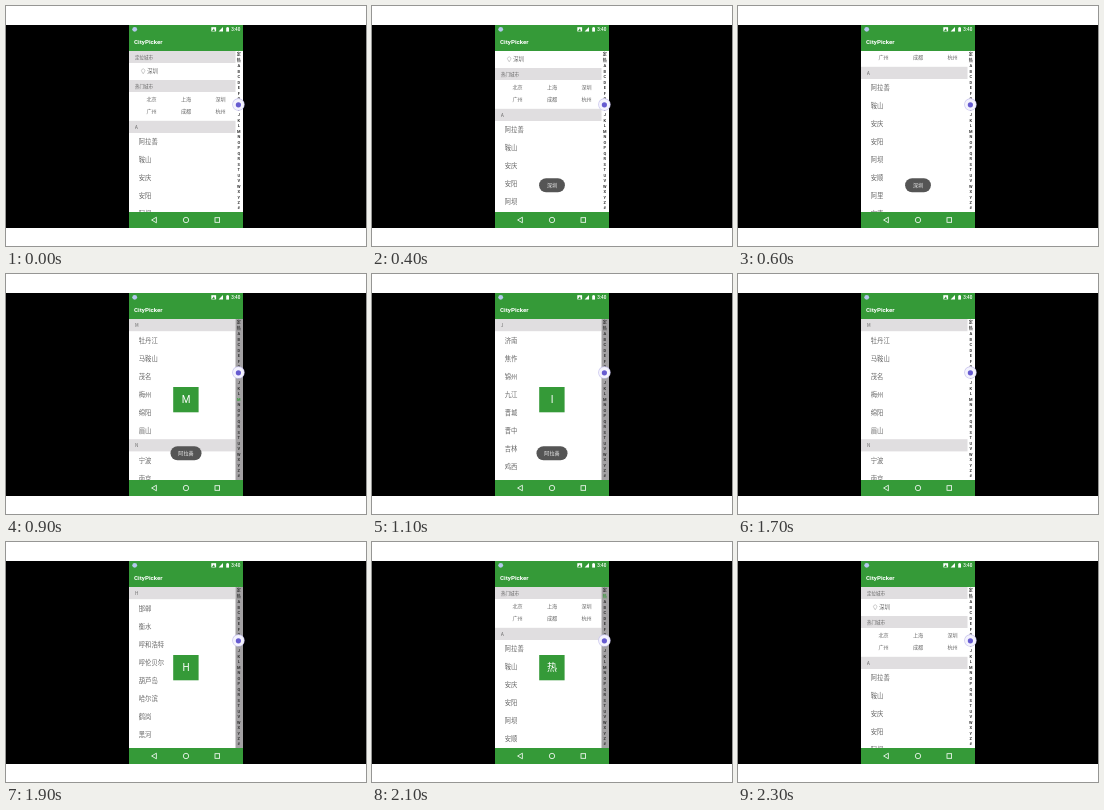
Recreate the animation shown at these times as an HTML page with a canvas. Size 360x240 px, loop 2400 ms.

```html
<!DOCTYPE html>
<html lang="zh-CN">
<head>
<meta charset="utf-8">
<title>CityPicker</title>
<style>
  html, body { margin: 0; width: 100%; height: 100%; overflow: hidden; background: #fff; }
  canvas { display: block; width: 360px; height: 240px; }
</style>
</head>
<body>
<canvas id="stage"></canvas>
<script>
const W = 360, H = 240, STEP = 100, LOOP = 2400;
const LEFT = 123, RIGHT = 237, TOP = 45, BOTTOM = 206, BAR = 229.5;
const HEAD = 12.2, ROW = 18;
const GREEN = '#359a38';
const CJK = '"Noto Sans CJK SC", "Noto Sans CJK", sans-serif';
const LATIN = 'Roboto, "Noto Sans CJK SC", "Noto Sans CJK", sans-serif';

const canvas = document.getElementById('stage');
const ratio = window.devicePixelRatio || 1;
canvas.width = W * ratio;
canvas.height = H * ratio;
const c = canvas.getContext('2d');
c.scale(ratio, ratio);

const hot = ['北京', '上海', '深圳', '广州', '成都', '杭州'];
const cities = {
  A: '阿拉善 鞍山 安庆 安阳 阿坝 安顺 阿里 安康 阿克苏',
  B: '北京 保定 包头 巴彦淖尔 本溪 白山 白城 蚌埠 亳州',
  C: '重庆 承德 沧州 长治 赤峰 朝阳 长春 常州 滁州',
  D: '大同 大连 丹东 大庆 东营 德州 东莞 德阳 达州',
  E: '鄂尔多斯 鄂州 恩施',
  F: '抚顺 阜新 阜阳 福州 抚州 佛山 防城港',
  G: '赣州 广州 桂林 贵港 广元 广安 贵阳 固原',
  H: '邯郸 衡水 呼和浩特 呼伦贝尔 葫芦岛 哈尔滨 鹤岗 黑河 淮安',
  J: '济南 焦作 锦州 九江 晋城 晋中 吉林 鸡西 佳木斯 嘉兴 金华',
  K: '开封 昆明 克拉玛依 喀什',
  L: '廊坊 临汾 吕梁 辽阳 辽源 连云港 丽水 六安 龙岩',
  M: '牡丹江 马鞍山 茂名 梅州 绵阳 眉山',
  N: '宁波 南京 南通 南平 宁德 南昌 南阳 南宁 内江'
};

// List blocks in content coordinates, and where each section starts
const blocks = [];
const start = { 定: 0, 热: 29 };
let end = 69.8;
for (const [letter, names] of Object.entries(cities)) {
  start[letter] = end;
  blocks.push({ y: end, h: HEAD, head: letter });
  end += HEAD;
  for (const name of names.split(' ')) {
    blocks.push({ y: end, h: ROW, name });
    end += ROW;
  }
}
const index = ['定', '热', ...'ABCDEFGHIJKLMNOPQRSTUVWXYZ', '#'];

// Per step: [scroll position or section, touched letter, toast, toast opacity]
const steps = [
  [0], [0, '', '深圳', .4], [0, '', '深圳', 1], [0, '', '深圳', 1],
  [12, '', '深圳', 1], [36, '', '深圳', 1], [54, '', '深圳', 1],
  [54, '', '阿拉善', 1], ['K', 'K', '阿拉善', 1], ['M', 'M', '阿拉善', 1],
  ['K', 'K', '阿拉善', 1], ['J', 'I', '阿拉善', 1], ['H', 'H', '阿拉善', .5],
  ['J', 'J'], ['K', 'K'], ['L', 'L'], ['M', 'M'], ['M'],
  ['L', 'L'], ['H', 'H'], ['C', 'C'], ['热', '热'], ['定', '定'], ['定']
];

function box(x, y, w, h, color) {
  c.fillStyle = color;
  c.fillRect(x, y, w, h);
}

function disc(x, y, r, color) {
  c.fillStyle = color;
  c.beginPath();
  c.arc(x, y, r, 0, Math.PI * 2);
  c.fill();
}

function shape(points, color) {
  c.fillStyle = color;
  c.beginPath();
  points.forEach(([x, y]) => c.lineTo(x, y));
  c.closePath();
  c.fill();
}

function text(str, x, y, size, color, align = 'left', family = CJK, weight = 400) {
  c.font = `${weight} ${size}px ${family}`;
  c.fillStyle = color;
  c.textAlign = align;
  c.textBaseline = 'alphabetic';
  c.fillText(str, x, y + size * .37);
}

function heading(label, y, h = HEAD) {
  box(LEFT, y, BAR - LEFT, h, '#e0dee0');
  text(label, 129, y + h / 2, 4.5, '#666');
}

function drawList(scroll) {
  c.save();
  c.beginPath();
  c.rect(LEFT, TOP, RIGHT - LEFT, BOTTOM - TOP);
  c.clip();
  const base = TOP - scroll;
  if (scroll < 70) {
    heading('定位城市', base, 12);
    c.strokeStyle = '#aaa';
    c.lineWidth = .6;
    c.beginPath();
    c.arc(137.2, base + 19.6, 1.7, Math.PI * .8, Math.PI * 2.2);
    c.lineTo(137.2, base + 22.8);
    c.closePath();
    c.stroke();
    text('深圳', 141.3, base + 20.4, 5.3, '#666');
    heading('热门城市', base + 29, 12);
    hot.forEach((name, i) =>
      text(name, 145.5 + i % 3 * 34.5, base + 48 + Math.floor(i / 3) * 12.5, 5.1, '#666', 'center'));
  }
  for (const b of blocks) {
    const y = base + b.y;
    if (y > BOTTOM || y + b.h < TOP) continue;
    if (b.head) heading(b.head, y);
    else text(b.name, 132.7, y + b.h / 2, 6.35, '#666');
  }
  c.restore();
}

function drawIndex(touched) {
  if (touched) box(BAR, TOP, RIGHT - BAR, BOTTOM - TOP, '#a3a1a3');
  index.forEach((ch, i) =>
    text(ch, 232.8, 48.8 + i * 5.47, 4, ch === touched ? GREEN : '#333', 'center', LATIN, 700));
  // Floating button
  disc(232.4, 98.5, 6.2, '#c9c5ee');
  disc(232.4, 98.5, 5.5, '#f4f3fd');
  disc(232.4, 98.8, 2.6, '#665bd0');
}

function drawBars() {
  box(LEFT, 19, RIGHT - LEFT, TOP - 19, GREEN);
  box(LEFT, BOTTOM, RIGHT - LEFT, 222 - BOTTOM, GREEN);
  disc(128.7, 23.3, 2.4, '#b4c8ec');
  box(205.3, 21.2, 4.8, 4.2, '#fff');
  shape([[206, 25], [208, 22.2], [208.8, 25]], GREEN);
  shape([[212.6, 25.5], [217, 25.5], [217, 21]], '#fff');
  box(220.2, 21.6, 2.8, 4, '#fff');
  box(220.9, 21, 1.4, .8, '#fff');
  text('3:40', 225.2, 23.4, 4.6, '#fff', 'left', LATIN, 500);
  text('CityPicker', 128, 36, 6.2, '#fff', 'left', LATIN, 700);

  c.strokeStyle = '#fff';
  c.lineWidth = .8;
  c.beginPath();
  c.moveTo(145.6, 214);
  c.lineTo(150.4, 211.2);
  c.lineTo(150.4, 216.8);
  c.closePath();
  c.stroke();
  c.beginPath();
  c.arc(180, 214, 2.7, 0, Math.PI * 2);
  c.stroke();
  c.strokeRect(209, 211.7, 4.6, 4.6);
}

function drawToast(label, opacity) {
  const w = label.length * 5.2 + 15.4;
  c.globalAlpha = opacity;
  c.fillStyle = '#555';
  c.beginPath();
  c.roundRect(180 - w / 2, 172.3, w, 14, 7);
  c.fill();
  text(label, 180, 179.2, 5.1, '#eee', 'center');
  c.globalAlpha = 1;
}

function draw(now) {
  const [place, touched, toast, opacity] = steps[Math.floor(now % LOOP / STEP)];
  box(0, 0, W, H, '#fff');
  box(0, 19, W, 203, '#000');
  box(LEFT, 19, RIGHT - LEFT, 203, '#fff');
  drawList(typeof place === 'number' ? place : start[place]);
  drawIndex(touched);
  drawBars();
  if (touched) {
    box(167.2, 113, 25.4, 25.3, GREEN);
    text(touched, 180, 125.7, 10, '#fff', 'center', LATIN);
  }
  if (toast) drawToast(toast, opacity);
}

const origin = performance.now();
function tick() {
  draw(performance.now() - origin);
  requestAnimationFrame(tick);
}
tick();
</script>
</body>
</html>
```
